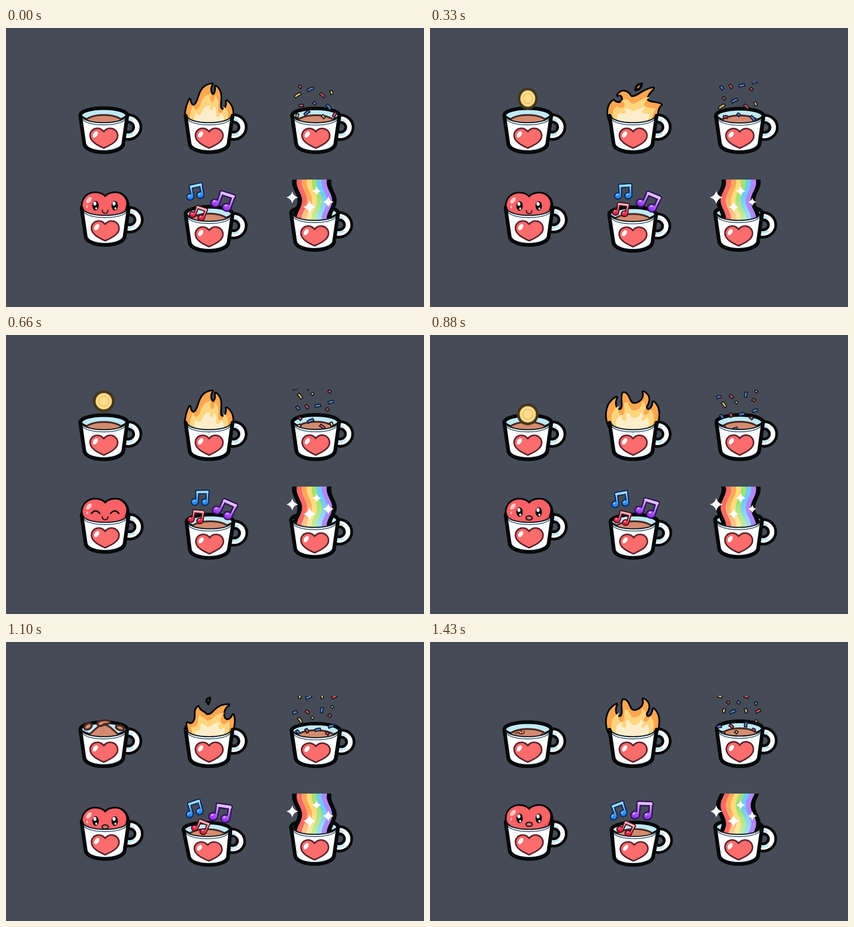
Write an HTML page with a canvas that moves like this. It is 917x611 px and loops after 1.54 s.

```html
<!DOCTYPE html>
<html lang="en">
<head>
<meta charset="utf-8">
<title>Six mugs</title>
<style>
html, body { margin: 0; width: 100%; height: 100%; overflow: hidden; background: #454c57; }
canvas { display: block; }
</style>
</head>
<body>
<canvas width="917" height="611"></canvas>
<script>
const ctx = document.querySelector('canvas').getContext('2d');
const STEP = 110, STEPS = 14, TAU = Math.PI * 2;
const BLACK = '#070809', ICE = '#bfeafa', COFFEE = '#d48b6f', COCOA = '#4a2a24';
const KEY_STEPS = [0, 2, 4, 6, 9, 11, 13];
let step = 0, sway = 0;

// Value of a track at the current step, linear between its keys
function at(keys) {
  let i = 0;
  while (i < 5 && KEY_STEPS[i + 1] <= step) i++;
  const u = (step - KEY_STEPS[i]) / (KEY_STEPS[i + 1] - KEY_STEPS[i]);
  return keys[i] + (keys[i + 1] - keys[i]) * u;
}

function paint(shape, fill, stroke, width = 3) {
  const path = typeof shape === 'string' ? new Path2D(shape) : shape;
  if (fill) { ctx.fillStyle = fill; ctx.fill(path); }
  if (stroke) { ctx.strokeStyle = stroke; ctx.lineWidth = width; ctx.stroke(path); }
}

function oval(x, y, rx, ry, angle = 0, from = 0, to = TAU) {
  const path = new Path2D();
  path.ellipse(x, y, rx, ry, angle, from, to);
  return path;
}

function group(draw) { ctx.save(); draw(); ctx.restore(); }

// ---- mug, drawn in the coordinates of the first one ----
const BODY = 'M163 192L172 255C176 268 200 272 214.5 272C229 272 253 268 257 255L266 192';
const FRONT = 'M166 192C170 212 259 212 263 192L257 255C253 268 229 272 214.5 272C200 272 176 268 172 255Z';
const HEART = 'M214.5 227C206 214 184 219 184.5 236C185 250 204 258 214.5 263C225 258 245 250 245 236C245 219 223 214 214.5 227Z';
const inside = oval(214.5, 191, 48, 14.5);

function mugBack() {
  const ring = oval(268, 217, 20, 19);
  paint(ring, null, BLACK, 22);
  paint(ring, null, '#fff', 10);
  paint(oval(268, 217, 18, 17, 0, 1, 2), null, ICE, 5);
  paint(oval(268, 217, 18, 17, 0, -1.9, -1.1), null, ICE, 5);
  paint(BODY, '#fff', BLACK, 8);
  paint(oval(214.5, 191, 51.5, 15.5), ICE, BLACK, 8);
}

function coffee(surface = oval(214.5, 206, 41, 15.5)) {
  group(() => {
    const room = new Path2D();
    room.addPath(inside);
    room.rect(170, 175, 89, 32);
    ctx.clip(room);
    paint(surface, COFFEE, COCOA, 4);
  });
}

function mugFront() {
  group(() => {
    ctx.clip(new Path2D(FRONT));
    paint(FRONT, ICE);
    paint('M160 188L262 188C258 225 261 252 247 259C233 268 200 269 184 262C174 257 172 235 160 188Z', '#fff');
  });
  paint('M166 193C172 212 257 212 263 193', null, '#152029', 2.6);
  paint('M167 198C173 217 256 217 262 198', null, '#35566a', 1.8);
  paint(BODY, null, BLACK, 8);
  paint(HEART, '#fb6c6c', '#5e2630', 3.4);
  paint(oval(196, 233, 4.5, 7.5, 0.6), '#fff');
}

function mug(x, y, content, pose = () => {}) {
  const placed = draw => group(() => { ctx.translate(x, y); pose(); draw(); });
  placed(() => { mugBack(); if (content.coffee) coffee(content.surface); });
  group(content.draw || (() => {}));
  placed(mugFront);
}

// Deform around the foot of the mug
function poseFromFoot(sx, skew, sy) {
  ctx.translate(214.5, 276);
  ctx.transform(sx, 0, skew, sy, 0, 0);
  ctx.translate(-214.5, -276);
}

// ---- coin ----
function coinSurface() {
  if (step >= 10 && step <= 12) return 'M170 210C190 202 198 182 214.5 181C231 182 240 202 259 210Z';
  if (step === 1 || step === 2) return 'M170 210C180 192 200 188 214.5 187C229 188 249 192 259 210Z';
}

function coin() {
  const y = at([210, 164, 145, 145, 188, 235, 235]);
  const squeeze = at([0.4, 0.82, 1, 1, 1, 1, 1]);
  if (step === 1 || step === 2) {
    paint('M192 200C198 193 206 196 204 200M237 200C231 193 224 196 226 200M204 204C210 207 220 207 226 204', null, COCOA, 2);
  }
  if (step > 0 && step < 10) {
    const disc = (r, color) => paint(oval(214.5, y, r * squeeze, r), color);
    group(() => {
      ctx.beginPath();
      ctx.rect(150, 100, 130, 106);
      ctx.clip();
      disc(24, '#46351f'); disc(18, '#fbcf72'); disc(16, '#ffe092');
      disc(12, '#edae57'); disc(10.5, '#ffdc8a');
    });
  }
  if (step === 9) {
    paint('M181 207C183 194 190 197 192 202C195 196 200 203 203 203C210 206 220 206 227 203C230 203 234 196 237 202C240 197 246 194 249 207Z', COFFEE, COCOA, 2.5);
  }
  if (step >= 10 && step <= 12) {
    const drop = step === 11 ? 0 : 7;
    paint(oval(180, 178 + drop, 9, 6, -0.6), COFFEE, COCOA, 4.5);
    paint(`M201 ${174 + drop}c-3 -7 8 -9 11 -9c8 -2 17 0 16 5c-2 4 -8 1 -13 3c-4 5 -12 5 -14 1Z`, COFFEE, COCOA, 4.5);
    paint(oval(250, 181 + drop, 9, 5, 0.3), COFFEE, COCOA, 4.5);
  }
  if (step === 13) {
    paint('M184 198C188 192 198 192 202 196M188 201C191 196 198 198 195 201M198 201C204 202 208 199 207 196M243 203L247 201', null, COCOA, 2.4);
  }
}

// ---- fire ----
const FLAMES = {
  tall: ['M397 208C391 190 396 172 403 157C405 167 408 172 414 169C427 160 420 127 452 123C445 132 449 146 455 147C461 142 461 134 460 128C476 140 469 158 470 174C474 186 487 176 484 160C500 172 499 190 493 208Z'],
  wide: ['M398 208C383 186 383 150 409 137C402 150 408 166 418 164C428 158 418 138 424 127C436 127 436 146 444 150C454 154 474 142 468 125C482 132 482 144 474 156C472 168 488 168 490 147C505 158 504 184 493 208Z'],
  curled: ['M398 208C386 192 390 166 403 159C408 166 421 166 423 158C424 148 418 144 412 147C420 134 434 138 440 150C450 157 468 134 490 132C480 142 474 150 476 158C484 166 498 162 507 168C496 176 500 192 493 208Z',
    'M451 136C451 125 458 123 465 122C463 130 460 135 451 136Z'],
  low: ['M398 208C404 194 396 186 398 177C406 184 414 176 415 168C418 160 412 150 422 142C424 152 434 152 440 160C458 162 456 138 488 138C473 146 474 171 486 171C493 170 496 164 498 160C504 176 496 194 493 208Z',
    'M440 130C440 124 444 123 448 122C447 128 446 132 444 136Z']
};

function fire() {
  const u = step % 5.6;
  const [flame, spark] = FLAMES[u < 1 || u >= 5 ? 'tall' : u < 3 ? 'wide' : u < 4 ? 'curled' : 'low'];
  paint(flame, '#ffa650', BLACK, 7.5);
  paint(flame, '#ffa650');
  for (const [sx, sy, color] of [[0.82, 0.75, '#ffd57e'], [0.64, 0.46, '#fdeecb']]) {
    group(() => {
      ctx.translate(445, 208);
      ctx.scale(sx, sy);
      ctx.translate(-445, -208);
      paint(flame, color);
    });
  }
  if (spark) paint(spark, '#e8853c', BLACK, 5);
}

// ---- confetti: x, height at the start, angle in degrees, length ----
const CONFETTI = {
  '#ef5350': [
    [645, 129, 45, 7], [694, 147, 40, 12], [648, 170, 0, 9], [721, 190, -60, 11], [660, 103, 60, 9], [705, 109, 35, 7],
    [710, 70, 30, 7], [661, 62, 40, 9], [720, 29, -25, 11], [654, 10, 40, 6], [694, -3, 20, 10]],
  '#4a8ee8': [
    [668, 134, -25, 14], [677, 165, 40, 7], [708, 173, 50, 13], [660, 186, -40, 13], [640, 106, 55, 9], [684, 101, -10, 12],
    [713, 93, -18, 12], [634, 63, -15, 10], [693, 58, -80, 11], [664, 30, -22, 13], [677, 10, 40, 7], [715, 12, 70, 7]],
  '#f5c85c': [
    [640, 147, -32, 15], [714, 141, 70, 8], [639, 192, -80, 8], [696, 194, 45, 8], [645, 80, 55, 13], [672, 75, 40, 6],
    [716, 51, -40, 5], [645, 28, -80, 9], [693, 28, 75, 9], [636, -3, 10, 9]]
};

function confetti() {
  const fall = at([0, 16, 34, 54, 82, 100.5, 122.5]);
  ctx.beginPath();
  ctx.rect(600, 118, 150, 95);
  ctx.clip();
  for (const color in CONFETTI) {
    for (const [x, top, angle, length] of CONFETTI[color]) {
      const y = top + fall;
      if (y < 108 || y > 208) continue;
      group(() => {
        ctx.translate(x, y);
        ctx.rotate(angle * TAU / 360);
        const h = length / 2;
        paint(`M${-h} -2.5Q0 -4 ${h} -2.5V3Q0 1.5 ${-h} 3Z`, color, '#1d1d2a', 2.4);
      });
    }
  }
}

// ---- heart with a face ----
function face() {
  ctx.translate(0, -3 * sway);
  const shape = 'M217.5 371C207 356 170 357 168 388C168 400 175 412 184 420L251 420C260 412 267 400 267 388C265 357 228 356 217.5 371Z';
  paint(shape, '#e8484f', BLACK, 7.5);
  group(() => {
    ctx.clip(new Path2D(shape));
    paint(oval(214, 384, 50, 30), '#fa6266');
  });
  paint(oval(182, 377, 4.5, 8, 0.7), '#ffc9c9');
  paint(oval(178, 391, 2, 3.5), '#ffb0b0');
  const closed = step >= 5 && step <= 7;
  for (const x of [196.5, 238.5]) {
    if (closed) {
      paint(`M${x - 9} 392Q${x} 381 ${x + 9} 392`, null, '#1d0d10', 3.4);
    } else {
      paint(oval(x, 389, 7, 10.5), BLACK);
      paint(oval(x - 1.5, 384.5, 3.4, 4.2), '#fff');
      paint(oval(x + 1.5, 395, 2.2, 2.6), '#fff');
    }
  }
  if (step < 8) paint('M211 399Q212 406 217.5 406Q223 406 224 399', null, '#40151a', 2.6);
  else paint(oval(217.5, 402, 7, 4.5), '#c9807a', '#40151a', 3);
}

// ---- music notes ----
function note(x, y, angle, scale, light, main, dark) {
  group(() => {
    ctx.translate(x, y);
    ctx.rotate(angle * TAU / 360);
    ctx.scale(scale, scale);
    const shade = ctx.createLinearGradient(0, -18, 0, 18);
    shade.addColorStop(0, light);
    shade.addColorStop(1, main);
    for (const [color, extra] of [[dark, 6], [shade, 0]]) {
      paint('M-8 12V-15L19 -16V12', null, color, 4 + extra);
      paint('M-8 -14L19 -15', null, color, 6 + extra);
      for (const head of [-14, 13]) paint(oval(head, 12, 8 + extra / 2, 7 + extra / 2, -0.2), color);
    }
    for (const head of [-17, 10]) paint(oval(head, 9, 2, 1.6, -0.5), light);
  });
}

function notes() {
  note(at([414, 420, 428, 426, 412, 411, 411]), at([358, 359, 356, 356, 361, 368, 369]),
    at([-10, -5, 2, 1, -13, -20, -19]), 0.83, '#a6e4ff', '#1b7df2', '#0b2658');
  note(at([476, 479, 481, 480, 474, 467, 465]), at([377, 376, 380, 379, 376, 370, 368]),
    at([20, 22, 28, 26, 15, 6, 4]), 1, '#e6ccff', '#9030ee', '#35105c');
  note(at([422, 421, 416, 417, 425, 429, 430]), at([404, 398, 395, 397, 401, 406, 407]),
    at([20, 14, 4, 8, 20, 26, 26]), 0.74, '#ffc0c8', '#dd1236', '#430a18');
}

// ---- rainbow ----
const BANDS = ['#fb6a66', '#fea75d', '#ffdb78', '#9fe374', '#71cafd', '#b088fa'];
const WAVE_PHASES = '00123301230123';

function star(x, y, r) {
  const p = r * 0.2;
  paint(`M${x} ${y - r}Q${x + p} ${y - p} ${x + r} ${y}Q${x + p} ${y + p} ${x} ${y + r}Q${x - p} ${y + p} ${x - r} ${y}Q${x - p} ${y - p} ${x} ${y - r}Z`, '#fff');
}

function rainbow() {
  const phase = +WAVE_PHASES[step], crest = 378 - 20 * phase;
  const wave = y => 676.5 + 6 * Math.cos((y - crest) / 80 * TAU);
  const band = (left, right, color) => {
    const path = new Path2D();
    for (let y = 332; y <= 424; y += 2) path.lineTo(wave(y) + left, y);
    for (let y = 424; y >= 332; y -= 2) path.lineTo(wave(y) + right, y);
    paint(path, color);
  };
  band(-43, 43, BLACK);
  BANDS.forEach((color, i) => band(-33 + 11 * i, -22 + 11 * i + (i < 5 ? 0.5 : 0), color));
  const glow = ctx.createLinearGradient(0, 365, 0, 422);
  glow.addColorStop(0, 'rgba(255,255,235,0)');
  glow.addColorStop(1, 'rgba(255,255,235,.4)');
  band(-22, 22, glow);
}

function stars() {
  const phase = +WAVE_PHASES[step];
  const sizes = [[13, 10, 14, 12], [15, 12, 10, 8], [14, 11, 11, 9], [13, 10, 13, 10]][phase];
  [[628, 371], [681.5, 357], [666, 392], [707, 381]].forEach(([x, y], i) => star(x, y, sizes[i]));
}

function draw(time) {
  step = Math.floor(time / STEP) % STEPS;
  sway = Math.sin(step / 5.6 * TAU);
  const squash = 0.006 - 0.027 * sway, lean = 4.8 * sway;

  ctx.fillStyle = '#454c57';
  ctx.fillRect(0, 0, 917, 611);
  ctx.lineJoin = ctx.lineCap = 'round';

  mug(0, 0, { coffee: true, surface: coinSurface(), draw: coin });
  mug(231, 0, { draw: fire });
  mug(465, 0, { coffee: true, draw: confetti }, () => poseFromFoot(1 + squash, 0, 1 - squash));
  mug(3, 203, { draw: face });
  mug(231, 216, { coffee: true }, () => poseFromFoot(1, -lean / 85, 1 - 0.0085 * Math.abs(lean)));
  notes();
  mug(462.5, 214, { draw: rainbow });
  stars();
}

const start = performance.now();
function tick() {
  draw(performance.now() - start);
  requestAnimationFrame(tick);
}
tick();
</script>
</body>
</html>
```
